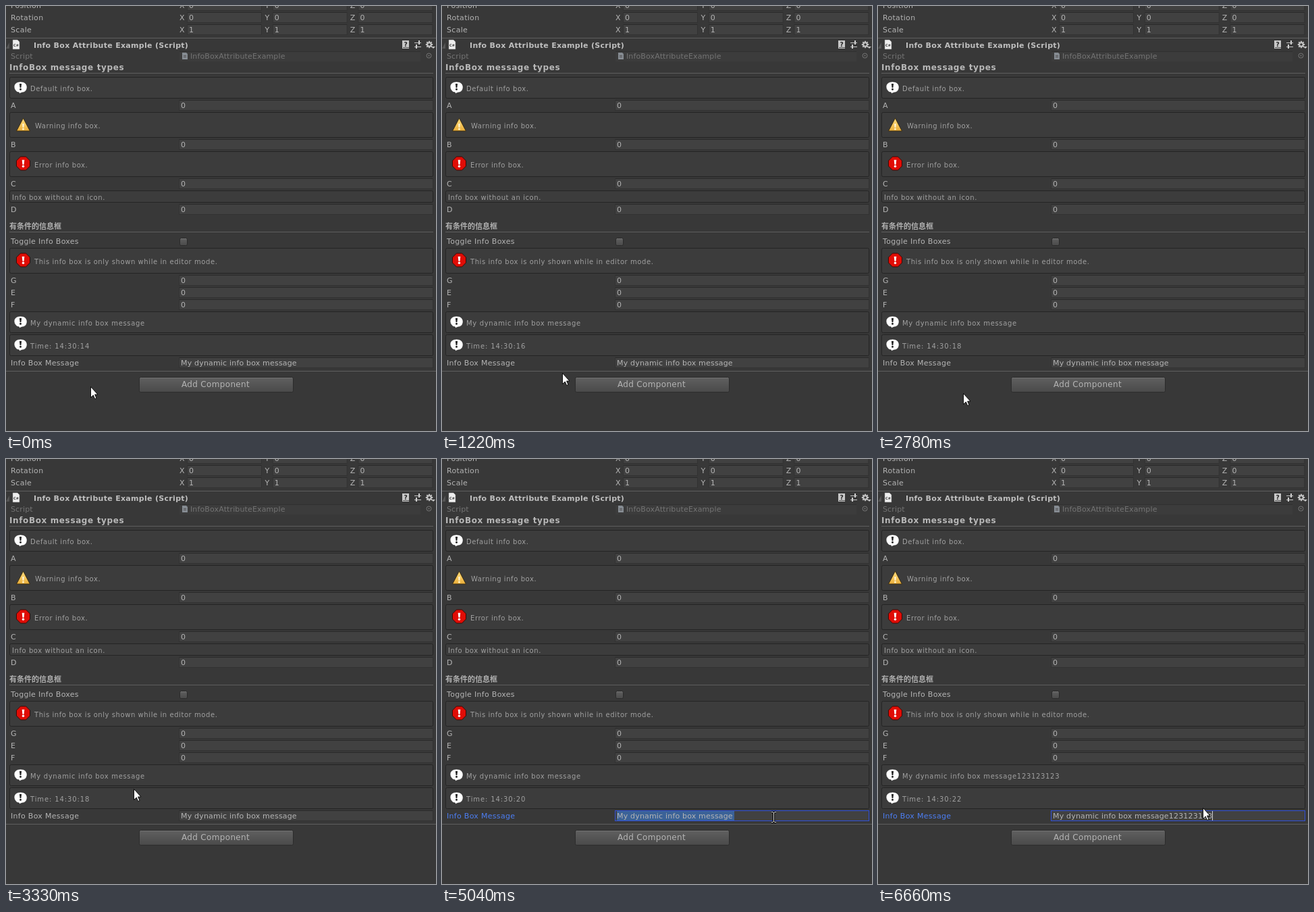
Write an HTML page that moves like this. It is 637 px wide and 629 px high and loops after 7.06 s.

```html
<!DOCTYPE html>
<html lang="en">
<head>
<meta charset="utf-8">
<title>Info box inspector</title>
<style>
  html, body { margin: 0; width: 100%; height: 100%; overflow: hidden; background: #383838; }
  svg { display: block; width: 637px; height: 629px; }
  text { font: 11px Verdana, "DejaVu Sans", sans-serif; letter-spacing: .3px; fill: #b4b4b4; white-space: pre; }
  .value { letter-spacing: .18px; }
  .dim { letter-spacing: .13px; fill: #747474; }
  .title { font-weight: bold; fill: #c0c0c0; }
  .section { font-weight: bold; font-size: 12px; letter-spacing: .62px; fill: #b8b8b8; }
  .cjk { font: bold 11px "Noto Sans CJK SC", "Noto Sans CJK", sans-serif; letter-spacing: 0; fill: #b0b0b0; }
  .help { font-size: 10px; letter-spacing: .57px; fill: #a0a0a0; }
  .echo { letter-spacing: .67px; }
  .clock { letter-spacing: .88px; }
  .button { font-size: 12px; letter-spacing: .33px; }
  .tiny { font-size: 5px; font-weight: bold; letter-spacing: 0; fill: #333; }
  .focused { fill: #4c7ef3; }
</style>
</head>
<body>
<svg id="stage" viewBox="0 0 637 629" xmlns="http://www.w3.org/2000/svg"></svg>
<script>
const LOOP = 7060;
const stage = document.getElementById('stage');

// ---- drawing helpers -------------------------------------------------
const text = (x, y, str, cls = '', id = '') =>
  `<text x="${x}" y="${y + 4}" class="${cls}" id="${id}">${str}</text>`;
const rect = (x, y, w, h, fill, extra = '') =>
  `<rect x="${x}" y="${y}" width="${w}" height="${h}" fill="${fill}" ${extra}/>`;
const path = (d, fill, extra = '') => `<path d="${d}" fill="${fill}" ${extra}/>`;
const rule = (x, y, w) => rect(x, y, w, 1, '#5e5e5e');
const at = (x, y, body) => `<g transform="translate(${x} ${y})">${body}</g>`;

const field = (x, y, w, str) =>
  rect(x - .5, y - 7.5, w, 15, '#414141', 'stroke="#323232"') + rect(x, y - 8, w - 1, 1, '#2a2a2a') +
  text(x + 2, y, str, 'value');

const row = (y, label, str) => text(7, y, label) + field(257, y, 376, str);

const vector = (y, label, n) => text(7, y, label) +
  ['X', 'Y', 'Z'].map((axis, i) =>
    text(257 + i * 126.4, y, axis) + field(269 + i * 126.7, y, 110, n)).join('');

const mark = (x, y, color, s = 1) => at(x, y,
  path(`M${-1.6 * s} ${-5 * s}h${3.2 * s}l${-.7 * s} ${6 * s}h${-1.8 * s}z`, color) +
  `<circle cy="${3.3 * s}" r="${1.5 * s}" fill="${color}"/>`);

const icons = {
  info: y => path(`M14 ${y + 4}C9 ${y - 3} 14 ${y - 9} 21.5 ${y - 9}C29 ${y - 9} 32 ${y - 4} 31 ${y + 1}C30 ${y + 5} 27 ${y + 7} 24 ${y + 7}L19 ${y + 9}L19.500 ${y + 7}Q16 ${y + 7} 14 ${y + 4}z`,
    '#fff', 'stroke="#222" stroke-width=".7"') + mark(21.5, y - 1, '#222'),
  warning: y => path(`M25.500 ${y - 10}L35.500 ${y + 9}H15.500z`, 'url(#amber)',
    'stroke="#3a2c10" stroke-width="1" stroke-linejoin="round"') + mark(25.5, y + 3, '#fff3cf', .95),
  error: y => path(`M21.500 ${y - 11}h8l6 6v8l-6 6h-8l-6-6v-8z`, '#e00d06',
    'stroke="#3c0805" stroke-width="1" stroke-linejoin="round"') + mark(25.5, y - .5, '#fff', 1.15)
};

const helpBox = (y, h, icon, x, str, cls = '', id = '') => {
  const mid = y + h / 2;
  return `<rect x="5.500" y="${y - .5}" width="627" height="${h}" rx="2" fill="#3c3c3c" stroke="#242424"/>` +
    (icon ? icons[icon](mid - .5) : '') + text(x, mid, str, 'help ' + cls, id);
};

const gear = Array.from({ length: 8 }, (_, i) =>
  rect(-1, -5.2, 2, 3, '#c4c4c4', `transform="rotate(${i * 45})"`)).join('') +
  '<circle r="2.800" fill="none" stroke="#c4c4c4" stroke-width="2"/>';

const toolbar =
  path('M0 63L5 54V63z', '#555') +
  path('M10 50h7l3 3v11h-10z', '#eee', 'stroke="#777" stroke-width=".5"') + text(11, 55.500, 'C#', 'tiny') +
  rect(587, 51, 10, 12, '#c8c8c8') + rect(588, 61, 9, 1, '#555') +
  `<text x="589.500" y="60" style="font-size:9px;font-weight:bold;fill:#222">?</text>` +
  rect(605, 54, 10, 1, '#c4c4c4') + rect(605, 60, 10, 1, '#c4c4c4') +
  rect(611, 51, 2, 6, '#d0d0d0') + rect(607, 57, 2, 6, '#d0d0d0') +
  at(627, 57, gear) + path('M630 60h6l-3 3z', '#c4c4c4');

const scriptRow = text(7, 74, 'Script', 'dim') +
  rect(257, 67, 357, 15, '#3c3c3c') + rect(257, 67, 357, 1, '#303030') +
  path('M261 69h6l2 2v8h-8z', '#858b92') + rect(263, 73, 4, 1, '#555') + rect(263, 75, 4, 1, '#555') +
  text(273, 74, 'InfoBoxAttributeExample', 'dim') +
  '<circle cx="626.500" cy="73.500" r="3.500" fill="none" stroke="#777"/><circle cx="626.500" cy="73.500" r="1" fill="#777"/>';

const numbers = { A: 147, B: 205, C: 263, D: 301, G: 406, E: 424, F: 442 };
const MESSAGE = 'My dynamic info box message';

stage.innerHTML = `<defs>
  <linearGradient id="amber" x2="0" y2="1"><stop stop-color="#ffdf80"/><stop offset="1" stop-color="#eaae3a"/></linearGradient>
  <linearGradient id="raised" x2="0" y2="1"><stop stop-color="#606060"/><stop offset="1" stop-color="#4a4a4a"/></linearGradient>
</defs>` + [
  rect(0, 0, 637, 629, '#383838'),
  vector(-1, 'Position', 0), vector(17, 'Rotation', 0), vector(35, 'Scale', 1),
  rule(0, 47, 637), toolbar,
  text(41, 58, 'Info Box Attribute Example (Script)', 'title'),
  scriptRow,
  text(5, 91, 'InfoBox message types', 'section'), rule(5, 99, 628),
  helpBox(106, 31, 'info', 36, 'Default info box.'),
  helpBox(158, 37, 'warning', 43, 'Warning info box.'),
  helpBox(216, 37, 'error', 42, 'Error info box.'),
  helpBox(274, 17, '', 9, 'Info box without an icon.'),
  text(5, 326, '有条件的信息框', 'title cjk'), rule(5, 334, 628),
  text(7, 348, 'Toggle Info Boxes'),
  rect(257.5, 343.5, 11, 11, 'url(#raised)', 'rx="2" stroke="#2a2a2a"') + rect(259, 344, 8, 1, '#747474'),
  helpBox(359, 37, 'error', 42, 'This info box is only shown while in editor mode.'),
  ...Object.entries(numbers).map(([label, y]) => row(y, label, 0)),
  helpBox(453, 31, 'info', 36, MESSAGE, 'echo', 'echo'),
  helpBox(487, 31, 'info', 36, '', 'clock', 'clock'),
  text(7, 528, 'Info Box Message', '', 'label'), field(257, 528, 376, ''),
  rect(256.5, 520.5, 376, 15, 'none', 'id="focus" stroke="#3050d8"'),
  rect(259, 521, 174, 14, '#3b6298', 'id="selection"'),
  text(259, 528, MESSAGE, 'value', 'input'),
  rect(0, 521, 1, 14, '#d0d0d0', 'id="caret"'),
  rule(0, 540, 637),
  rect(197.5, 549.5, 228, 22, 'url(#raised)', 'rx="2" stroke="#2c2c2c"'),
  rect(199, 550, 225, 1, '#727272'),
  text(260, 560, 'Add Component', 'button'),
  `<g id="slider">${path('M624.500 -3v6l-3-3zM625.500 -3v6l3-3z', '#707070')}</g>`,
  `<g id="arrow">
    <g id="slide">${path('M-3 -.5v6l-4-3zM7 -.5v6l4-3z', '#fff', 'stroke="#111" stroke-width=".8"')}</g>
    ${path('M-.5 -.5V15.500L3.300 12L5.700 17.500L8 16.500L5.600 11H10z', '#fff', 'stroke="#000" stroke-width=".9"')}
  </g>`,
  `<g id="beam" fill="none">${['#000" stroke-width="3', '#e8e8e8" stroke-width="1'].map(s =>
    `<path d="M-3 -7.500H-1L.5 -6.500L2 -7.500H4M.5 -6.500V6.500M-3 7.500H-1L.5 6.500L2 7.500H4" stroke="${s}"/>`).join('')}</g>`
].join('');

const el = Object.fromEntries([...stage.querySelectorAll('[id]')].map(n => [n.id, n]));

// ---- motion ------------------------------------------------------------
const STEP = 77.6;
// pointer circling: step, angle in degrees, centre x, centre y, radius x, radius y
const orbit = [
  [-1, 55, 85, 464.5, 71, 121.5],
  [15, 769.5, 114, 436, 100, 142],
  [25, 1101.3, 81, 486, 76, 91],
  [35, 1517.3, 105, 494, 100, 82],
  [50, 2111.4, 90.5, 498, 82.5, 72],
  [55, 2345, 90, 500, 82, 72]
];
// pointer after it has left the orbit: time, x, y
const rests = [[4540, 490, 530], [4650, 490, 529], [5650, 482, 516], [6510, 482, 515], [6580, 481, 514], [6660, 482, 517]];
const ticks = [[0, 14], [910, 16], [1700, 17], [2480, 18], [3400, 19], [4330, 20], [5500, 21], [6360, 22]];
const keys = [5650, 5730, 5810, 5890, 5970, 6050, 6130, 6280, 6360];

const mix = (a, b, p) => a + (b - a) * p;
const latest = (table, t) => table.filter(entry => entry[0] <= t).pop();

function circle(k) {
  const i = Math.max(1, orbit.findIndex(o => o[0] >= k));
  const a = orbit[i - 1], b = orbit[i], p = (k - a[0]) / (b[0] - a[0]);
  const [, deg, cx, cy, rx, ry] = a.map((v, j) => mix(v, b[j], p));
  const rad = deg * Math.PI / 180;
  return [cx + rx * Math.cos(rad), cy + ry * Math.sin(rad)];
}

function pointer(t, k) {
  const rest = latest(rests, t);
  if (rest) return rest.slice(1);
  if (k <= 55) return circle(k);
  const [x, y] = circle(55), p = (k - 55) / 3;
  return [mix(x, 490, p), mix(y, 530, p)];
}

const show = (node, on) => node.setAttribute('visibility', on ? 'visible' : 'hidden');
const move = (node, x, y) => node.setAttribute('transform', `translate(${x} ${y})`);

function render(t) {
  const k = Math.max(-1, Math.floor((t - 70) / STEP + .25));
  const [x, y] = pointer(t, k).map(Math.round);
  const focused = t >= 4550, selected = t >= 4650 && t < 5110;
  const beam = t >= 5040 && t < 5650;

  const hot = k > 9 && x < 256 && Object.values(numbers).find(n => Math.abs(y - n) <= 8);
  show(el.slider, hot);
  show(el.slide, hot);
  move(el.slider, 0, hot || 0);
  move(el.arrow, x, y);
  move(el.beam, 491, 530);
  show(el.arrow, !beam);
  show(el.beam, beam);

  const typed = '123123123'.slice(0, keys.filter(key => key <= t).length);
  el.echo.textContent = el.input.textContent = MESSAGE + typed;
  el.clock.textContent = 'Time: 14:30:' + latest(ticks, t)[1];
  el.label.classList.toggle('focused', focused);
  show(el.focus, focused);
  show(el.selection, selected);
  show(el.caret, focused && !selected);
  el.caret.setAttribute('x', Math.round(259 + el.input.getComputedTextLength()));
}

function tick() {
  render(performance.now() % LOOP);
  requestAnimationFrame(tick);
}
tick();
</script>
</body>
</html>
```
